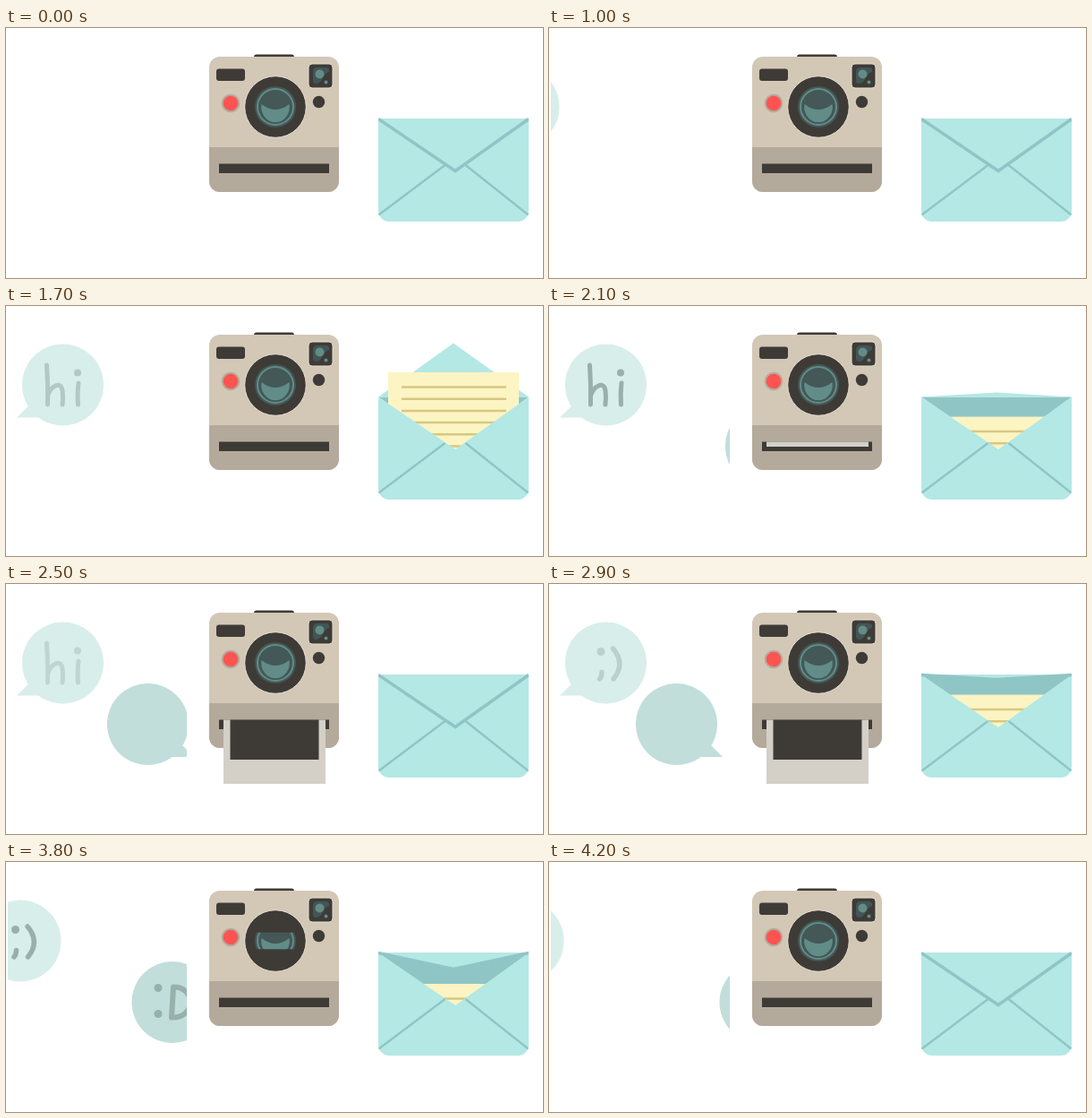
An HTML page for the animation above (4.3 s loop, 600 px wide and 279 px high).

```html
<!DOCTYPE html>
<html lang="en">
<head>
<meta charset="utf-8">
<title>Chat, camera, letter</title>
<style>
  html, body { margin: 0; width: 100%; height: 100%; overflow: hidden; background: #fff; }
  svg { display: block; width: 100%; height: 100%; }
  .dark { fill: #3e3b37; }
  .glyph { fill: none; stroke: #98b0ac; stroke-linecap: round; stroke-linejoin: round; }
  .glyph circle { fill: #98b0ac; stroke: none; }
</style>
</head>
<body>
<svg viewBox="0 0 600 279">
  <defs>
    <clipPath id="chatArea"><rect x="2" y="30" width="200" height="190"/></clipPath>
    <clipPath id="shutter"><rect id="gap" x="276" width="50"/></clipPath>
    <clipPath id="slotArea"><rect x="238" y="151.5" width="123" height="110"/></clipPath>
    <clipPath id="mailArea"><rect x="416" y="30" width="168" height="170"/></clipPath>
  </defs>

  <g clip-path="url(#chatArea)">
    <g id="bubble1">
      <path d="M12 124.5L28 109L50 124.5Z" fill="#d8eeea"/>
      <circle cx="63.5" cy="88" r="45.5" fill="#d8eeea"/>
      <g id="hi" class="glyph" stroke-width="5" aria-label="hi">
        <path d="M45.5 66Q47 88 46.5 110M47 99C50 90 61 83 63 94Q64 102 63 110M81 86Q79.500 98 80.500 110"/>
        <circle cx="80" cy="74.500" r="4"/>
      </g>
      <g id="wink" class="glyph" stroke-width="5.500" aria-label=";)">
        <circle cx="58" cy="75.500" r="4.500"/>
        <path d="M59 98.500Q59 103 56.500 106M71.500 72Q86 89 72 106"/>
      </g>
    </g>
    <g id="bubble2">
      <path d="M194 193L178 177L156 193Z" fill="#c1dedb"/>
      <circle cx="142.5" cy="156.5" r="45.5" fill="#c1dedb"/>
      <g id="grin" class="glyph" stroke-width="6" aria-label=":D">
        <circle cx="126.500" cy="140.500" r="4.500"/>
        <circle cx="126.500" cy="169.500" r="4.500"/>
        <path d="M143.500 139.500L141.500 173.500C170 174 168 139 143.500 139.500Z"/>
      </g>
    </g>
  </g>

  <g id="camera">
    <rect class="dark" x="277" y="29.5" width="45" height="8" rx="3"/>
    <rect x="227" y="32" width="145" height="151" rx="12" fill="#d3c7b6"/>
    <path d="M227 133H372V171a12 12 0 0 1-12 12H239a12 12 0 0 1-12-12Z" fill="#b4aa9b"/>
    <rect class="dark" x="235" y="45.5" width="32" height="13.5" rx="3"/>
    <rect class="dark" x="338" y="40" width="27" height="27" rx="4" stroke="#e8dfd2"/>
    <path d="M343 49q0-5 5-5h9q5 0 4 5q-6 2-7 7q-3 6-8 6q-3 0-3-4Z" fill="#435554"/>
    <circle cx="350.5" cy="51.5" r="5" fill="#628c87"/>
    <circle cx="357.5" cy="60.5" r="2" fill="#628c87"/>
    <circle cx="251" cy="84" r="9.300" fill="#fd5452" stroke="#b4aa9b" stroke-width="2"/>
    <circle class="dark" cx="349.5" cy="82.500" r="6.700"/>
    <circle class="dark" cx="301" cy="88" r="34.300" stroke="#e8dfd2"/>
    <g clip-path="url(#shutter)">
      <circle cx="301" cy="88" r="23" fill="#435857"/>
      <circle cx="301" cy="88" r="20" fill="none" stroke="#628c87" stroke-width="2"/>
      <path d="M285.500 85Q301 97 316.500 85A15.800 17 0 1 1 285.500 85Z" fill="#628c87"/>
    </g>
    <rect class="dark" x="238" y="151.5" width="123" height="10.5"/>
    <g clip-path="url(#slotArea)">
      <g id="photo">
        <rect x="243" y="-110" width="114" height="110" fill="#d4d0c8"/>
        <rect class="dark" x="250.500" y="-110" width="99" height="83"/>
      </g>
    </g>
  </g>

  <g id="mail">
    <path d="M416 101.500H584L502 161Z" fill="#8fc6c5"/>
    <path id="flapUp" fill="#b3e8e5"/>
    <g clip-path="url(#mailArea)">
      <g id="letter">
        <rect x="427" width="146" height="100" fill="#fcf4c3"/>
        <path d="M442 16.500h117m0 13.200h-117m0 13.200h117m0 13.200h-117m0 13.200h117m0 13.200h-117"
              fill="none" stroke="#d6c882" stroke-width="2.500" stroke-dasharray="117 13.200"/>
      </g>
    </g>
    <path d="M416 101.500L502 160L584 101.500V204a12 12 0 0 1-12 12H428a12 12 0 0 1-12-12Z" fill="#b3e8e5"/>
    <path d="M416.500 208.500L490.500 153M583.500 208.500L513.500 153" stroke="#8fc6c5" stroke-width="2.500"/>
    <g clip-path="url(#mailArea)">
      <path id="flapDown" fill="#b3e8e5" stroke="#8fc6c5" stroke-width="3.500"/>
    </g>
  </g>
</svg>
<script>
const LOOP = 4300, STEP = 100;
const $ = id => document.getElementById(id);
const clamp = (v, lo, hi) => Math.min(hi, Math.max(lo, v));
const set = (id, name, value) => $(id).setAttribute(name, value);
const move = (id, x, y) => set(id, 'transform', `translate(${x} ${y})`);
const ramp = (t, start, length = 250) => clamp((t - start) / length, 0, 1);

function drawChat(t) {
  // Offsets from the resting places: slide in, rest, slide out.
  move('bubble1', Math.min(0, (t - 1464) * .21) - Math.max(0, t - 3376) * .112, 0);
  move('bubble2', Math.max(0, (2576 - t) * .21) + Math.max(0, t - 3452) * .125, 0);
  set('hi', 'opacity', ramp(t, 1550) - ramp(t, 2350));
  set('wink', 'opacity', ramp(t, 2780));
  set('grin', 'opacity', ramp(t, 3400));
}

function drawCamera(t) {
  const blink = Math.min(Math.abs(t - 1420), Math.abs(t - 3720));
  const half = Math.min(24, blink * .115);
  set('gap', 'y', 88 - half);
  set('gap', 'height', half * 2);
  move('photo', 0, Math.min(252, 256 - Math.abs(t - 2700) * .165));
}

function drawMail(t) {
  const u = t < 2500 ? t : t - 1600; // the envelope opens twice
  const drop = clamp(Math.max(-18 - (u - 1400) * .23, -5 + (u - 2100) * .23), -60, 58);
  const flap = `M416 101.500L${drop > 40 ? 502 : 500} ${101.5 + drop}L584 101.500`;
  set('flapUp', 'd', drop < 0 ? flap : '');
  set('flapDown', 'd', drop < 0 ? '' : flap);
  move('letter', 0, Math.min(160, 74 + Math.abs(u - 1700) * .124));
}

function draw(now) {
  const t = Math.floor(now % LOOP / STEP) * STEP;
  drawChat(t);
  drawCamera(t);
  drawMail(t);
  requestAnimationFrame(tick);
}

const start = performance.now();
const tick = () => draw(performance.now() - start);
tick();
</script>
</body>
</html>
```
